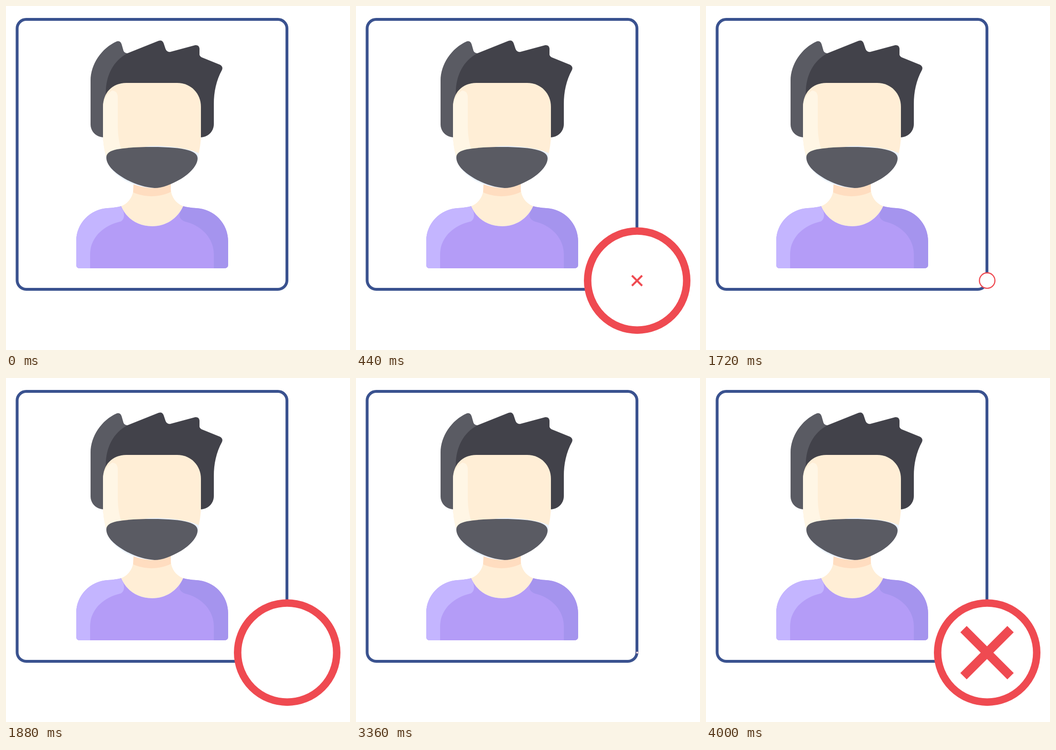
These frames come from a looping animation (720x720 px, 5 s). An HTML page:

```html
<!DOCTYPE html>
<html>
<head>
<meta charset="utf-8">
<style>
html, body { margin: 0; width: 100%; height: 100%; overflow: hidden; background: #fff; }
svg { display: block; width: 100vw; height: 100vh; }
</style>
</head>
<body>
<svg viewBox="0 0 720 720">
  <rect x="23.3" y="28" width="564.7" height="565" rx="19" fill="#fff" stroke="#3a528f" stroke-width="6"/>

  <!-- hair -->
  <path fill="#5a5b63" d="M204 275C188 274 177 262 177 248V156C177 122 200 88 232 74Q239 72 242 80L246 94Q248 99 256 99L270 110L220 200Z"/>
  <path fill="#42424a" d="M209 190C207 150 222 116 254 99L319 73Q327 70 330 78L334 90Q337 97 344 96L396 82Q404 81 405 89V102Q406 106 411 108L448 123Q455 127 452 134C440 156 435 180 435 205V247C435 262 424 274 408 275L398 200H209Z"/>

  <!-- face -->
  <path fill="#ffeed6" d="M203 211C203 182 222 161 252 161H358C388 161 408 184 408 211V270Q408 292 401 318L306 350L209 314Q203 290 203 270Z"/>
  <path fill="#fff6e5" d="M203 211C203 198 209 186 222 177Q234 178 234 192V252Q234 280 242 302L209 314Q203 290 203 270Z"/>

  <!-- neck -->
  <path fill="#ffeed6" d="M267 370V380C267 397 257 413 241 419C252 445 276 461 306 461C334 461 358 446 371 419C355 413 346 399 345 384V370Z"/>
  <path fill="#ffddc0" d="M267 370H345V389C322 401 290 401 266 390Z"/>

  <!-- mask -->
  <path fill="#ebf3ff" d="M212 325C220 305 280 293 316 293C350 294 385 299 403 308Q403 318 400 325L311 381C285 381 257 373 237 357Q218 344 212 325Z"/>
  <path fill="#5a5b63" d="M210 317C210 308 218 303 232 300C255 296 280 295 306 295C340 295 365 297 382 302C395 306 401 311 401 319C401 333 386 350 366 362C345 374 327 381 311 381C290 380 262 371 240 356C222 344 210 331 210 317Z"/>

  <!-- shirt -->
  <path fill="#b49cf7" d="M147 541V492C147 455 176 425 213 423Q230 422 241 419C252 445 276 461 306 461C334 461 358 446 371 419Q382 422 398 423C436 425 465 455 465 493V541Q465 549 457 549H154Q147 549 147 541Z"/>
  <path fill="#c4b5ff" d="M176 549V520C176 488 200 460 240 451C247 447 248 440 246 430L241 419Q230 422 213 423C176 425 147 455 147 492V541Q147 549 154 549Z"/>
  <path fill="#a594ee" d="M435 549V520C435 488 412 460 374 451C364 447 362 441 364 433L371 419Q382 422 398 423C436 425 465 455 465 493V541Q465 549 457 549Z"/>

  <!-- badge -->
  <g stroke="#ef4a51">
    <circle id="ring" r="103.7" fill="#fff" stroke-width="15.6"/>
    <path id="cross" d="M-49.2-49.2L49.2 49.2M49.2-49.2L-49.2 49.2" stroke-width="18.8"/>
  </g>
</svg>
<script>
const LOOP = 5000, STEP = 40, CYCLE = 100; // cycle counted in 1/60 s ticks
const ring = document.getElementById('ring');
const cross = document.getElementById('cross');

function progress(tick, start, end) {
  const p = Math.min(1, Math.max(0, (tick - start) / (end - start)));
  return p * p * (3 - 2 * p);
}

function place(el, x, y, scale) {
  el.setAttribute('transform', `translate(${x} ${y}) scale(${scale})`);
  el.style.display = scale ? '' : 'none';
}

function draw(ms) {
  const step = Math.floor(ms % LOOP / STEP);
  const tick = Math.floor(step * STEP * 60 / 1000) % CYCLE;
  place(ring, 588.5, 574.7, progress(tick, 0, 12));
  place(cross, 588.2, 574.9, progress(tick, 20, 40));
}

const begin = performance.now();
function loop() {
  draw(performance.now() - begin);
  requestAnimationFrame(loop);
}
loop();
</script>
</body>
</html>
```
